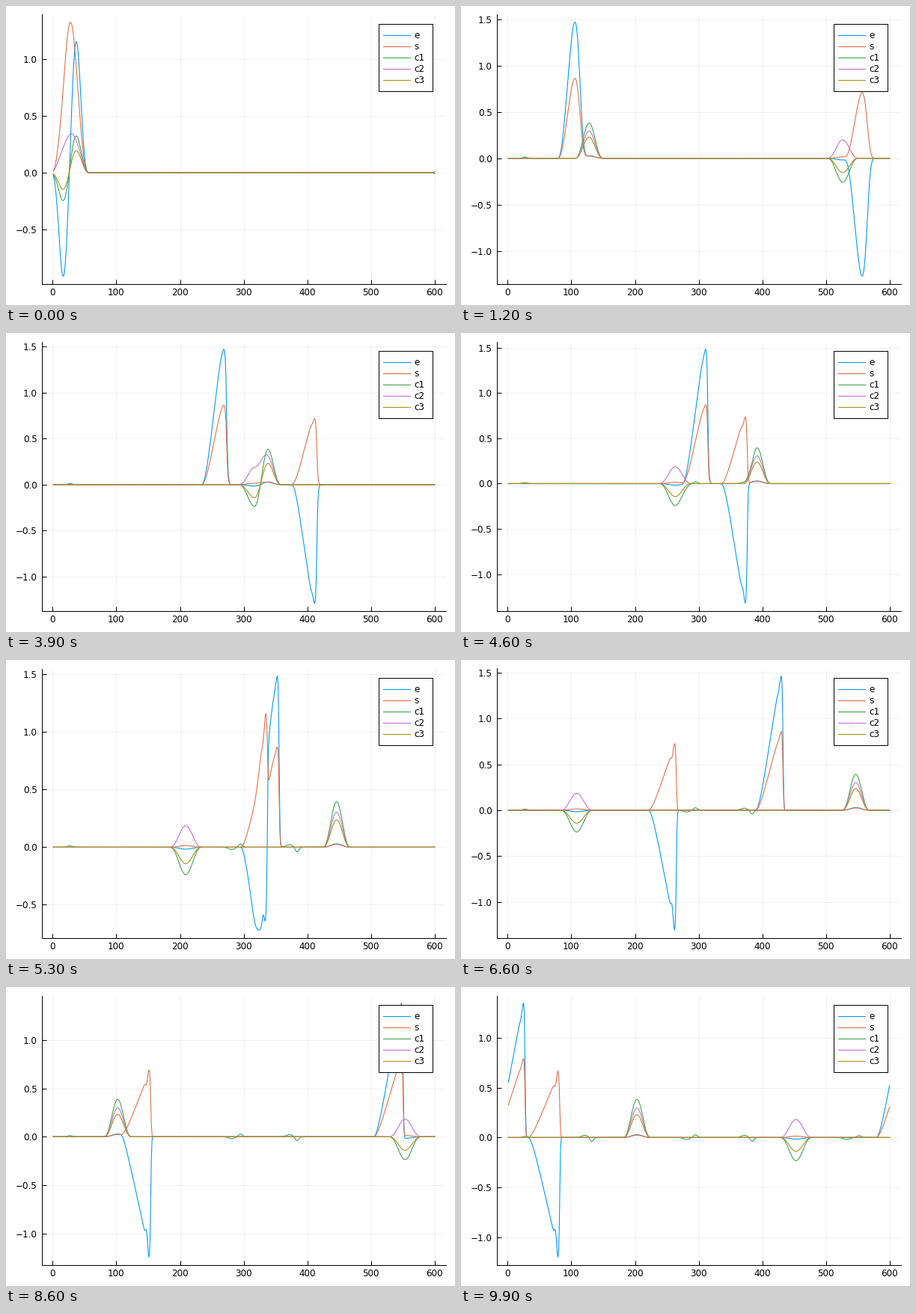
Write a matplotlib script that moves like this. It is 600 by 400 pixels and loops after 10 s.

```python
import numpy as np
import matplotlib.pyplot as plt
from matplotlib.animation import FuncAnimation
from matplotlib.patches import Rectangle
from matplotlib.ticker import MultipleLocator

PX = 0.72  # points per pixel at 100 dpi
N, X0 = 600, 27
FRAMES, INTERVAL = 100, 100
NAMES = ["e", "s", "c1", "c2", "c3"]
COLORS = ["#009afa", "#e36f47", "#3ea44e", "#c371d2", "#ac8e18"]

plt.rcParams["font.family"] = "DejaVu Sans"
plt.rcParams["axes.unicode_minus"] = True

x = np.arange(1, N + 1)
y = np.arange(-40, 40, 0.05)     # foot points of the characteristics
z = np.arange(-40, 60.1, 0.5)    # coordinate moving with the wave
kernel = np.exp(-0.5 * (np.arange(-8, 9) * 0.5) ** 2)
kernel /= kernel.sum()


def bump(d, half, power=2.5):
    return np.cos(np.pi * np.clip(d / half, -1, 1) / 2).clip(0) ** power


def gauss(d, width):
    return np.exp(-(d / width) ** 2)


def local(center):
    """Periodic distance from a centre."""
    return (x - center + N / 2) % N - N / 2


def shock_wave(tau, speed, amp, steep, ripple):
    """Burgers pulse by the Lax-Oleinik formula, carried at a base speed."""
    u0 = amp * bump(y, 23)
    pot = steep * np.cumsum(u0) * 0.05
    foot = np.argmin(pot + (z[:, None] - y) ** 2 / (2 * tau), axis=1)
    u = np.convolve(u0[foot], kernel, mode="same")
    half = u.max() / 2
    i = np.nonzero(u > half)[0][-1]
    front = z[i] + 0.5 * (u[i] - half) / (u[i] - u[i + 1])
    grow = ripple * np.clip((tau - 30) / 30, 0, 1)
    u += grow * (gauss(z - front + 3.3, 1.6) - gauss(z - front + 7, 2))
    return np.interp(local(X0 + speed * tau), z, u, left=0, right=0)


def shear_wave(tau, speed, gain, stretch):
    """Linear pulse, reshaped while it leaves the overlap with the shocks."""
    k = np.clip(tau / 22, 0, 1)
    height = (1 + (gain - 1) * k) * (1 - 0.0006 * max(tau - 25, 0))
    half = 23 * (1 + (stretch - 1) * k)
    return height * bump(local(X0 + speed * tau), half)


# position, height, width and birth time of the standing traces in c1
TRACES = [(27, 0.012, 5, 6),
          (281, -0.02, 7, 44), (295, 0.027, 4.5, 44),
          (372, 0.022, 7, 44), (384, -0.042, 4, 44),
          (533, -0.018, 8, 90), (552, 0.02, 4.5, 90),
          (121, 0.022, 7, 90), (132, -0.042, 4, 90)]


def fields(tau):
    right = shock_wave(tau, 5.75, 1.48, 0.2, 0.025)
    left = shock_wave(tau, -5.72, 1.28, 0.255, 0.09)
    plus = shear_wave(tau, 7.76, 1.14, 0.95)
    minus = shear_wave(tau, -7.74, 0.87, 1.11)

    e = right - left + 0.026 * plus - 0.02 * minus
    s = 0.587 * right + 0.557 * left + 0.022 * plus + 0.017 * minus
    c1 = 0.352 * plus - 0.28 * minus
    c2 = 0.272 * plus + 0.217 * minus
    c3 = 0.211 * plus - 0.167 * minus
    for pos, height, width, birth in TRACES:
        c1 = c1 + height * np.clip((tau - birth) / 4, 0, 1) * gauss(x - pos, width)
    return [e, s, c1, c2, c3]


fig = plt.figure(figsize=(6, 4), dpi=100, facecolor="white")
ax = fig.add_axes([48 / 600, 28.5 / 400, 540 / 600, 360 / 400])
ax.set_xlim(1 - 0.03 * (N - 1), N + 0.03 * (N - 1))
ax.xaxis.set_major_locator(MultipleLocator(100))
ax.yaxis.set_major_locator(MultipleLocator(0.5))
ax.tick_params(direction="in", length=6 * PX, width=PX, pad=6 * PX,
               labelsize=12 * PX)
ax.tick_params(axis="x", pad=5.5 * PX)
ax.grid(True, color="black", alpha=0.1, linewidth=0.5 * PX)
ax.set_axisbelow(True)
for side in ("top", "right"):
    ax.spines[side].set_visible(False)
for side in ("left", "bottom"):
    ax.spines[side].set_linewidth(PX)

lines = [ax.plot(x, 0 * x, color=c, linewidth=1.1 * PX)[0] for c in COLORS]

# legend, in stage pixels with y pointing down
stage = fig.add_axes([0, 0, 1, 1])
stage.set(xlim=(0, 600), ylim=(400, 0))
stage.axis("off")
stage.add_patch(Rectangle((497.5, 23.5), 72.5, 90.5, facecolor="white",
                          edgecolor="black", linewidth=PX))
for k, (name, color) in enumerate(zip(NAMES, COLORS)):
    row = 38.5 + 15.1 * k
    stage.plot([503.5, 539.5], [row, row], color=color, linewidth=1.1 * PX)
    stage.text(545, row + 4.4, name, fontsize=12 * PX, va="baseline")


def update(frame):
    data = fields(frame + 1)
    for line, values in zip(lines, data):
        line.set_ydata(values)
    low, high = np.min(data), np.max(data)
    margin = 0.03 * (high - low)
    ax.set_ylim(low - margin, high + margin)
    return lines


anim = FuncAnimation(fig, update, frames=FRAMES, interval=INTERVAL,
                     repeat=True, repeat_delay=0, blit=False)
plt.show()
```
